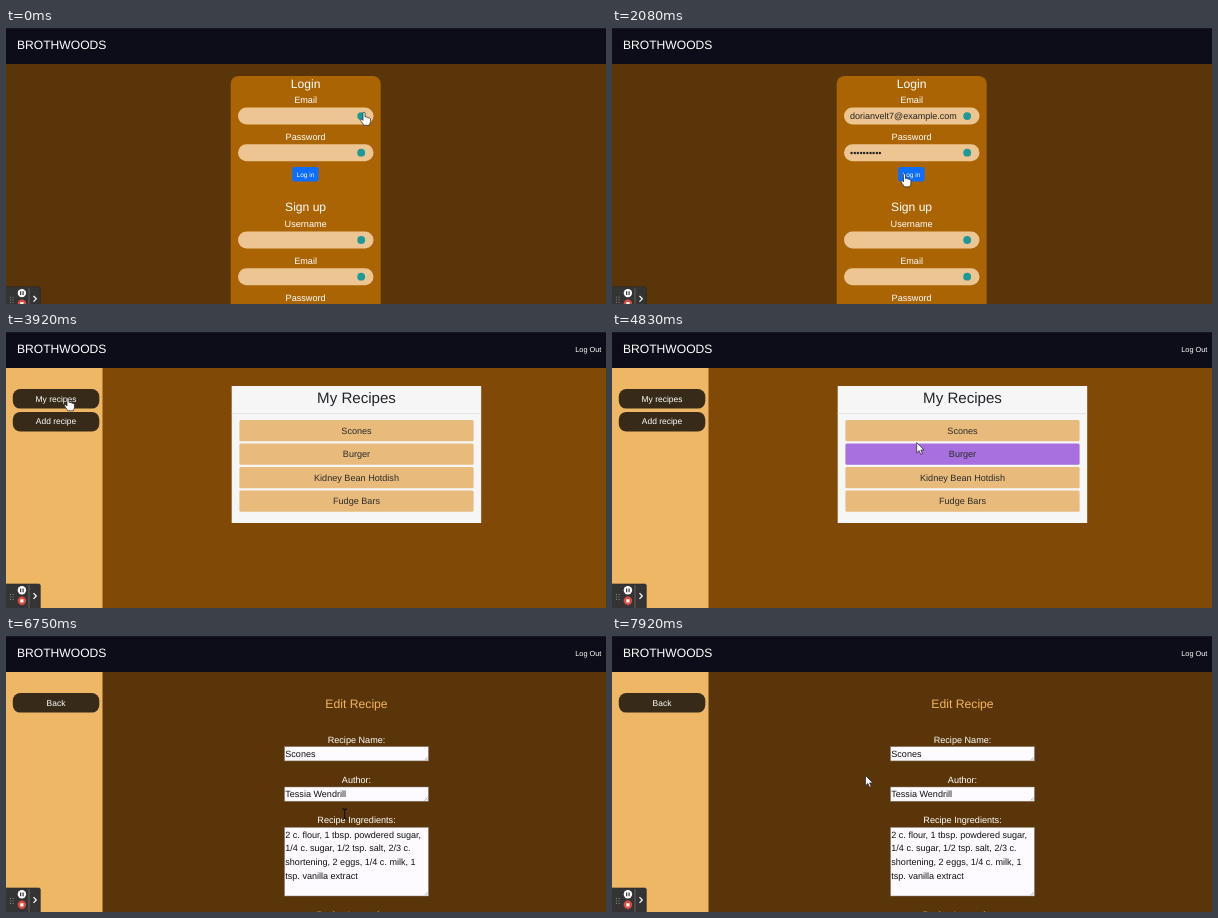
These frames come from a looping animation (600 px wide and 276 px high, 8000 ms). An HTML page:

```html
<!DOCTYPE html>
<html lang="en">
<head>
<meta charset="utf-8">
<title>Recipe box walkthrough</title>
<style>
  html, body { margin: 0; width: 100%; height: 100%; overflow: hidden; background: #5a3509; }
  svg { display: block; width: 100vw; height: 100vh; }
  text { font-family: "Liberation Sans", Arial, sans-serif; text-rendering: geometricPrecision; white-space: pre; }
</style>
</head>
<body>
<svg id="stage" viewBox="0 0 600 276" xmlns="http://www.w3.org/2000/svg"></svg>
<script>
const LOOP = 8000;
const HOVER_DELAY = 100;
const BRAND = 'BROTHWOODS';
const EMAIL = 'dorianvelt7@example.com';

const rect = (x, y, w, h, fill, rx = 0, extra = '') =>
  `<rect x="${x}" y="${y}" width="${w}" height="${h}" rx="${rx}" fill="${fill}" ${extra}/>`;
const text = (str, x, y, size, fill = '#fff', anchor = 'middle', extra = '') =>
  `<text x="${x}" y="${y}" font-size="${size}" fill="${fill}" text-anchor="${anchor}" ${extra}>${str}</text>`;
const lines = (list, x, y, step, size, fill) =>
  list.map((str, i) => text(str, x, y + i * step, size, fill, 'start')).join('');
const group = (id, body, extra = '') => `<g id="${id}" ${extra}>${body}</g>`;

const INGREDIENTS = '2 c. flour, 1 tbsp. powdered sugar,';

// Login page
const field = (label, y) =>
  text(label, 299.6, y - 4.4, 9.15) + rect(232, y, 135.5, 17, '#edc592', 8.5) +
  `<circle cx="355.2" cy="${y + 8.5}" r="3.9" fill="#1b9a99"/>`;

const popup = group('popup',
  rect(232, 97.5, 124.5, 48.5, '#fdfdfe', 2.5, 'filter="url(#shadow)"') +
  text('Passwords', 294, 108.6, 6.4, '#444') +
  '<path d="M342.5 105v2.6h1.6l3.6 1.8v-6.2l-3.6 1.8zM344 107.8l.6 2.2h1.2M349 104.4l1-.7M349.2 106.3h1.2M349 108.2l1 .7" fill="none" stroke="#444" stroke-width=".8"/>' +
  rect(232, 119, 124.5, 25, '#f7f7f8', 0, 'id="popupRow"') +
  rect(237.5, 124.7, 12.6, 12.4, '#f1b04e', 2.6) +
  '<path d="M242 131h1.4M244.5 131h1.4" stroke="#fff" stroke-width="1"/>' +
  text(EMAIL, 256, 129.8, 6, '#333', 'start') +
  text('brothwoods.herokuapp.com', 256, 136.2, 5.1, '#888', 'start') +
  '<circle cx="346.2" cy="130.4" r="3.1" fill="#b4b4b6"/><path d="M346.2 128.6v.8M346.2 130v2.2" stroke="#eee" stroke-width=".8"/>');

const login = group('login',
  rect(0, 36, 600, 240, '#5a3509') +
  rect(224.7, 48, 150, 240, '#aa6403', 8) +
  text('Login', 299.6, 59.5, 12.1) +
  field('Email', 79.6) + field('Password', 116.2) +
  group('filled', text(EMAIL, 238, 91.2, 9, '#222', 'start') + text('•'.repeat(10), 238, 128, 9, '#222', 'start')) +
  rect(286.2, 139, 26.3, 14.5, '#0d6efd', 2.2) +
  text('Log in', 299.4, 148.6, 6.5) +
  text('Sign up', 299.6, 183, 12.1) +
  field('Username', 203.5) + field('Email', 240.2) + field('Password', 277) + popup);

// Signed-in pages
const sideButton = (label, row) =>
  rect(6.8, 57.1 + row * 22.8, 86.5, 19.5, '#372a19', 7.5) +
  text(label, 50, 69.6 + row * 22.8, 8.45);
const page = (bg, ...buttons) =>
  rect(0, 36, 600, 320, bg) + rect(0, 36, 96.5, 320, '#edb766') + buttons.map(sideButton).join('');

const home = group('home', page('#804905', 'My recipes') +
  text(BRAND, 350.5, 190, 36.1, '#fff', 'middle', 'id="hero"'));

const rowTop = i => 88 + i * 23.5;
const recipes = ['Scones', 'Burger', 'Kidney Bean Hotdish', 'Fudge Bars'];
const list = group('list', page('#804905', 'My recipes', 'Add recipe') +
  rect(225.7, 54, 249.5, 137, '#f6f6f7') + rect(225.7, 81.3, 249.5, .7, '#dcdcdc') +
  text('My Recipes', 350.5, 71.3, 15.1, '#212529') +
  recipes.map((name, i) =>
    rect(233.4, rowTop(i), 234.2, 21.2, '#e8bb7d', 1.5, 'class="row"') +
    text(name, 350.5, rowTop(i) + 13.6, 9.1, '#2b2a29')).join(''));

const recipe = group('recipe', page('#804905', 'Back', 'Share') +
  rect(198, 66.6, 305, 121.6, '#fbfbfc', 2) +
  rect(203, 69, 295, 25.5, '#f4f4f5') + rect(203, 164.5, 295, 22, '#f4f4f5') +
  rect(203, 94.3, 295, .7, '#d6d6d6') + rect(203, 164, 295, .7, '#d6d6d6') +
  text('Scones', 350.5, 84.2, 15.2, '#212529') +
  lines([INGREDIENTS + ' 1/4 c. sugar, 1/2 tsp. salt, 2/3 c. shortening, 2',
    'eggs, 1/4 c. milk, 1 tsp. vanilla extract'], 209, 107.8, 9.3, 7.55, '#212529') +
  lines(['Stir together flour, powdered sugar, sugar, and salt. Cut shortening into these dry ingredients. Add in',
    'eggs, milk, and vanilla. Turn onto floured surface and shape into a 2-inch thick round. Cut into 6 pie-',
    'shaped pieces and place on greased &amp; floured baking sheet. Bake at 375 degrees Fahrenheit for 15-20',
    'minutes or until golden. Serve with butter and jam.'], 209, 128.2, 9.05, 6.03, '#2f3337') +
  rect(323.6, 168, 53.4, 17, '#8a5a1d', 8) + text('Edit', 350.4, 179.2, 8.5));

const area = (label, y, h, content) =>
  text(label, 350.5, y - 4.1, 9.1) +
  rect(278.6, y, 143.8, h, '#fdfbff', 0, 'stroke="#8a8178" stroke-width=".5"') +
  lines(content, 279.3, y + 10.4, 13.6, 9.05, '#111') +
  `<path d="M418.6 ${y + h - .8}l3-3M420.4 ${y + h - .8}l1.2-1.2" stroke="#777" stroke-width=".5"/>`;
const edit = group('edit', page('#5a3509', 'Back') +
  text('Edit Recipe', 350.5, 71.8, 12.2, '#f3b55c') +
  area('Recipe Name:', 110.7, 14.2, ['Scones']) +
  area('Author:', 151, 14.2, ['Tessia Wendrill']) +
  area('Recipe Ingredients:', 191.4, 68.6,
    [INGREDIENTS, '1/4 c. sugar, 1/2 tsp. salt, 2/3 c.', 'shortening, 2 eggs, 1/4 c. milk, 1', 'tsp. vanilla extract']) +
  area('Recipe Instructions:', 286.2, 68.6, ['Stir together flour, powdered', 'sugar, sugar, and salt. Cut']) +
  rect(415.2, 286.5, 7, 68, '#f1f1f1') + rect(416.2, 293.5, 5, 30, '#c1c1c1') +
  '<path d="M416.9 291.2h3.6l-1.8-2z" fill="#555"/>');

const header = rect(0, 0, 600, 36, '#0d0d19') + rect(0, 0, 600, .8, '#1b1b26') +
  text(BRAND, 11, 20.5, 12.1, '#fff', 'start') +
  text('Log Out', 595.4, 20.3, 7.35, '#fff', 'end', 'id="logout"');

const recorder = group('recorder',
  rect(-2, 252, 36.8, 30, '#343434', 1.5, 'stroke="#262626" stroke-width=".6"') +
  [4.4, 7].map(x => [262, 264.5, 267].map(y => rect(x, y, 1, 1, '#8d8d8d')).join('')).join('') +
  '<path d="M23.5 253v23" stroke="#777" stroke-width=".7"/>' +
  '<circle cx="16.4" cy="258.3" r="4.2" fill="#fff"/><path d="M15.2 256.4v3.8M17.6 256.4v3.8" stroke="#222" stroke-width="1.1"/>' +
  '<circle cx="16.4" cy="268.8" r="4.2" fill="#dc4b40"/>' + rect(14.8, 267.2, 3.2, 3.2, '#fff', .4) +
  '<path d="M28 261.2l2.8 2.8-2.8 2.8" fill="none" stroke="#fff" stroke-width="1.2"/>');

const pointers =
  group('hand', '<path d="M-1 .6C-1-.6 1-.6 1 .6V4.6C1.6 4 2.8 4.1 2.9 5 3.6 4.5 4.6 4.8 4.7 5.6 5.6 5.2 6.4 5.7 6.4 6.6V9.2C6.4 11 5.4 11.6 5.3 12.8H-.3C-.6 11.4-2.2 10-3.3 8-3.9 6.8-2.5 6.2-1.8 7L-1 7.9Z" fill="#fff" stroke="#222" stroke-width=".7"/>') +
  group('arrow', '<path d="M0 0V10.2L2.4 8 4 11.7 5.7 11 4.1 7.4H7.3Z" fill="#fff" stroke="#222" stroke-width=".7"/>') +
  group('beam', '<path d="M-2.4-5Q-.4-5 0-4 .4-5 2.4-5M0-4V4M-2.4 5Q-.4 5 0 4 .4 5 2.4 5" fill="none" stroke="#111" stroke-width="1.1"/>');

const stage = document.getElementById('stage');
stage.innerHTML =
  '<defs><filter id="shadow" x="-20%" y="-30%" width="140%" height="170%"><feDropShadow dx="0" dy="1.5" stdDeviation="2.5" flood-opacity=".35"/></filter></defs>' +
  group('scroller', login + home + list + recipe + edit + header) + recorder + group('cursor', pointers);

const $ = id => document.getElementById(id);
const rows = [...document.querySelectorAll('.row')];
const show = (id, on) => $(id).setAttribute('display', on ? 'inline' : 'none');

const scenes = [[0, 'login'], [2630, 'home'], [3920, 'list'], [5330, 'recipe'], [6330, 'edit']];
const shapes = [[0, 'hand'], [520, 'arrow'], [1000, 'beam'], [1560, 'hand'], [2750, 'arrow'], [3330, 'hand'],
  [4130, 'arrow'], [5800, 'hand'], [6330, 'arrow'], [6700, 'beam'], [7580, 'arrow']];
// time, x, y of the pointer hot spot
const path = [[0, 358, 84.5], [420, 358, 84.5], [1000, 328, 132], [1400, 328, 132], [1750, 292.5, 146],
  [2670, 292.5, 146], [3400, 62, 66], [4050, 62, 66], [4500, 298, 126], [4830, 304.7, 110.6],
  [5080, 318, 99], [5400, 318, 99], [5950, 364, 176], [6400, 364, 176], [6800, 337.5, 178],
  [7500, 337.5, 178], [7850, 253.5, 139.5], [8000, 253.5, 139.5]];
const scrolling = [[0, 0], [6870, 0], [7130, 35.3], [7600, 35.3], [7840, 0], [8000, 0]];

const current = (steps, t) => steps.filter(([at]) => at <= t).pop()[1];
function tween(keys, t, column = 1) {
  const next = Math.max(1, keys.findIndex(([at]) => at > t));
  const a = keys[next - 1], b = keys[next];
  const p = (t - a[0]) / (b[0] - a[0]);
  return a[column] + (b[column] - a[column]) * p * p * (3 - 2 * p);
}
const pointerAt = t => ({ x: tween(path, t, 1), y: tween(path, t, 2) });

function draw(t) {
  const scene = current(scenes, t), shape = current(shapes, t);
  const pointer = pointerAt(t);
  const hover = pointerAt(Math.max(0, t - HOVER_DELAY));
  scenes.forEach(([, id]) => show(id, id === scene));
  ['hand', 'arrow', 'beam'].forEach(id => show(id, id === shape));
  $('cursor').setAttribute('transform', `translate(${pointer.x} ${pointer.y})`);

  show('popup', t >= 330 && t < 1420);
  show('filled', t >= 1420);
  $('popupRow').setAttribute('fill', hover.y > 119 ? '#efeff1' : '#fdfdfe');

  const fade = Math.min(1, Math.max(0, (t - 2670) / 750));
  show('logout', scene !== 'login');
  $('logout').setAttribute('opacity', .12 + .88 * fade);
  $('hero').setAttribute('opacity', .4 + .6 * fade);

  rows.forEach((row, i) => {
    const hovered = hover.x > 233 && hover.y >= rowTop(i) && hover.y < rowTop(i) + 21.2;
    row.setAttribute('fill', hovered ? '#a770de' : '#e8bb7d');
  });

  $('recorder').setAttribute('transform', `translate(-.5 ${scene === 'login' ? 6.8 : 0})`);
  $('scroller').setAttribute('transform', `translate(0 ${-tween(scrolling, t)})`);
}

const start = performance.now();
function frame() {
  draw((performance.now() - start) % LOOP);
  requestAnimationFrame(frame);
}
frame();
</script>
</body>
</html>
```
